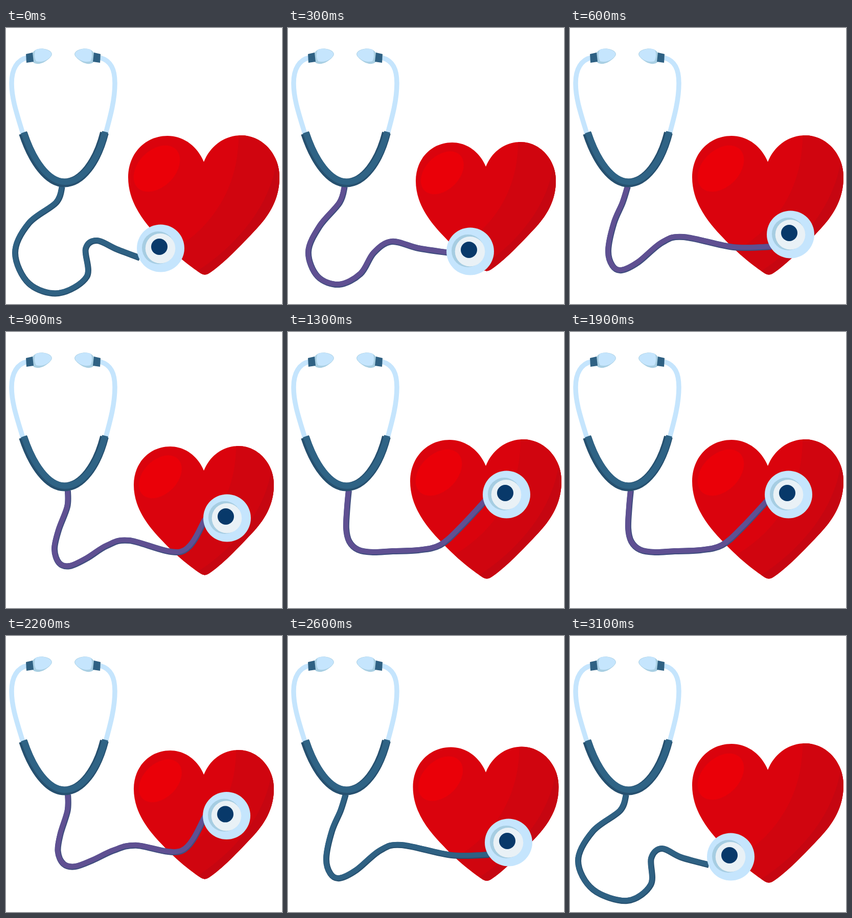
Write an HTML page that moves like this. It is 540 px wide and 540 px high and loops after 3200 ms.

```html
<!DOCTYPE html>
<html lang="en">
<head>
<meta charset="utf-8">
<title>Stethoscope and heart</title>
<style>
html, body { margin: 0; width: 100%; height: 100%; overflow: hidden; background: #fff; }
svg { display: block; width: 100%; height: 100%; }
</style>
</head>
<body>
<svg viewBox="0 0 540 540">
  <defs>
    <path id="heartShape" d="M387 262C374 230 346 211 316 211C273 211 239 245 239 292C239 345 275 385 300 411C330 443 360 466 381 480Q389 485 397 480C425 462 460 425 490 393C515 366 535 335 535 292C535 245 500 210 460 210C428 210 400 230 387 262Z"/>
    <clipPath id="heartClip"><use href="#heartShape"/></clipPath>
    <path id="yoke" d="M33.5 206C52 262 82 303 114 303C148 303 178 262 192.5 205"/>
    <g id="earpiece">
      <path d="M50 52C55 40 68 38 80 42C91 46 92 52 87 57C79 66 66 73 56 69C50 66 48 59 50 52Z" fill="#a9cfe3"/>
      <path d="M58 43C66 38 82 41 88 48C91 53 86 58 80 62C73 66 66 67 59 65C55 58 55 49 58 43Z" fill="#c5e5fd"/>
      <path d="M39 51L52 48L54 66L40 68Z" fill="#2f6183"/>
    </g>
  </defs>

  <g id="heart">
    <use href="#heartShape" fill="#da030d"/>
    <g clip-path="url(#heartClip)">
      <path d="M455 200C458 320 395 395 325 436L390 500H550V200Z" fill="#d0050f"/>
      <path d="M531 240C528 335 455 425 370 478L400 500H550V240Z" fill="#c60611"/>
      <ellipse cx="295" cy="275" rx="53" ry="36" transform="rotate(-45 295 275)" fill="#ea0008"/>
    </g>
  </g>

  <g fill="none">
    <path id="tubeShade" stroke-width="12"/>
    <path id="tube" stroke-width="9.8" transform="translate(-.8 -.9)"/>
    <g stroke="#c5e5fd" stroke-width="9.5">
      <path d="M34 210C22 170 11 140 11 108C11 80 22 62 42 58"/>
      <path d="M194 210C205 170 213 140 213 108C213 80 205 64 184 58"/>
    </g>
    <use href="#yoke" stroke="#26506f" stroke-width="17"/>
    <use href="#yoke" stroke="#2f6385" stroke-width="12" transform="translate(1.5 -2)"/>
  </g>
  <use href="#earpiece"/>
  <use href="#earpiece" transform="matrix(-1 0 0 1 224 0)"/>

  <g id="disc">
    <circle r="46.5" fill="#c5e5fd"/>
    <circle cx="-4.5" cy="-1" r="32" fill="#a6cde2"/>
    <circle cx="-.5" cy=".3" r="29.3" fill="#e9f1f6"/>
    <circle cx="-2.5" cy="-3" r="16" fill="#08396a"/>
  </g>
</svg>
<script>
const LOOP = 3200, STEP = 100, BEAT = 600;
const $ = id => document.getElementById(id);
const poses = [];

// Disc centre, x of the two top tube points, then the rest of the tube.
function pose(time, x, y, top, neck, ...rest) {
  poses.push([time, x, y, top, 310, neck, 342, ...rest]);
}

pose(100, 314.5, 432, 110, 98, 45, 382, 16, 440, 45, 496, 112, 518, 158, 487, 159, 435, 180, 416, 217, 433, 272, 448);
pose(300, 356.5, 437, 111, 101, 62, 388, 40, 438, 58, 486, 100, 502, 142, 481, 168, 440, 203, 418, 255, 431, 315, 440);
pose(600, 431.5, 404, 113, 103, 86, 382, 75, 435, 83, 465, 101, 474, 134, 458, 180, 420, 222, 409, 320, 429, 394, 428);
pose(900, 432.5, 364, 121, 120, 103, 388, 95, 425, 104, 452, 125, 458, 158, 443, 198, 418, 241, 408, 343, 430, 390, 367);
pose(1300, 427.5, 318, 119, 116, 114, 384, 120, 410, 137, 426, 166, 431, 205, 429, 255, 427, 298, 417, 338, 382, 390, 326);

// At rest the tube only slides a little from the first pose;
// the far end of the swing carries on past the last one.
const shift = { 0: -100, 1: -12, 2: -1, 9: 2, 12: 4, 13: -9, 14: 1, 17: -3, 18: -3, 19: -2, 23: -10, 24: 2 };
poses.unshift(poses[0].map((v, i) => v + (shift[i] || 0)));
const [before, last] = poses.slice(-2);
poses.push(last.map((v, i) => i ? v + 0.35 * (v - before[i]) : LOOP / 2));

function poseAt(time) {
  const n = poses.length - 1;
  let k = 0;
  while (k < n - 1 && time >= poses[k + 1][0]) k++;
  const a = poses[k], b = poses[k + 1], h = b[0] - a[0], u = (time - a[0]) / h;
  const slope = (j, i) => j === 0 || j === n ? 0 :
    (poses[j + 1][i] - poses[j - 1][i]) / (poses[j + 1][0] - poses[j - 1][0]);
  const blend = u * u * (3 - 2 * u);
  return a.map((v, i) => v + (b[i] - v) * blend
    + h * u * (1 - u) * ((1 - u) * slope(k, i) - u * slope(k + 1, i)));
}

function smoothPath(c) {
  const pts = [];
  for (let i = 0; i < c.length; i += 2) pts.push([c[i], c[i + 1]]);
  const at = i => pts[Math.max(0, Math.min(pts.length - 1, i))];
  const handle = (i, s) => at(i).map((v, j) => v + s * (at(i + 1)[j] - at(i - 1)[j]) / 6);
  let d = "M" + pts[0];
  for (let i = 1; i < pts.length; i++) d += "C" + [handle(i - 1, 1), handle(i, -1), pts[i]].join(" ");
  return d;
}

function draw(t) {
  const squeeze = (1 - Math.cos((t - 50) / BEAT * 2 * Math.PI)) / 2;
  const scale = 1 - 0.0855 * (squeeze - 0.067);
  $("heart").setAttribute("transform", `translate(387 387) scale(${scale}) translate(-387 -387)`);

  const [, x, y, ...line] = poseAt(Math.min(t, LOOP - t));
  const d = smoothPath(line);
  const purple = t >= 300 && t <= 2200;
  $("tubeShade").setAttribute("d", d);
  $("tubeShade").setAttribute("stroke", purple ? "#3f4d7e" : "#26506f");
  $("tube").setAttribute("d", d);
  $("tube").setAttribute("stroke", purple ? "#5f5092" : "#2f6183");
  $("disc").setAttribute("transform", `translate(${x} ${y})`);
}

function tick() {
  draw(Math.floor(performance.now() % LOOP / STEP) * STEP);
  requestAnimationFrame(tick);
}
tick();
</script>
</body>
</html>
```
